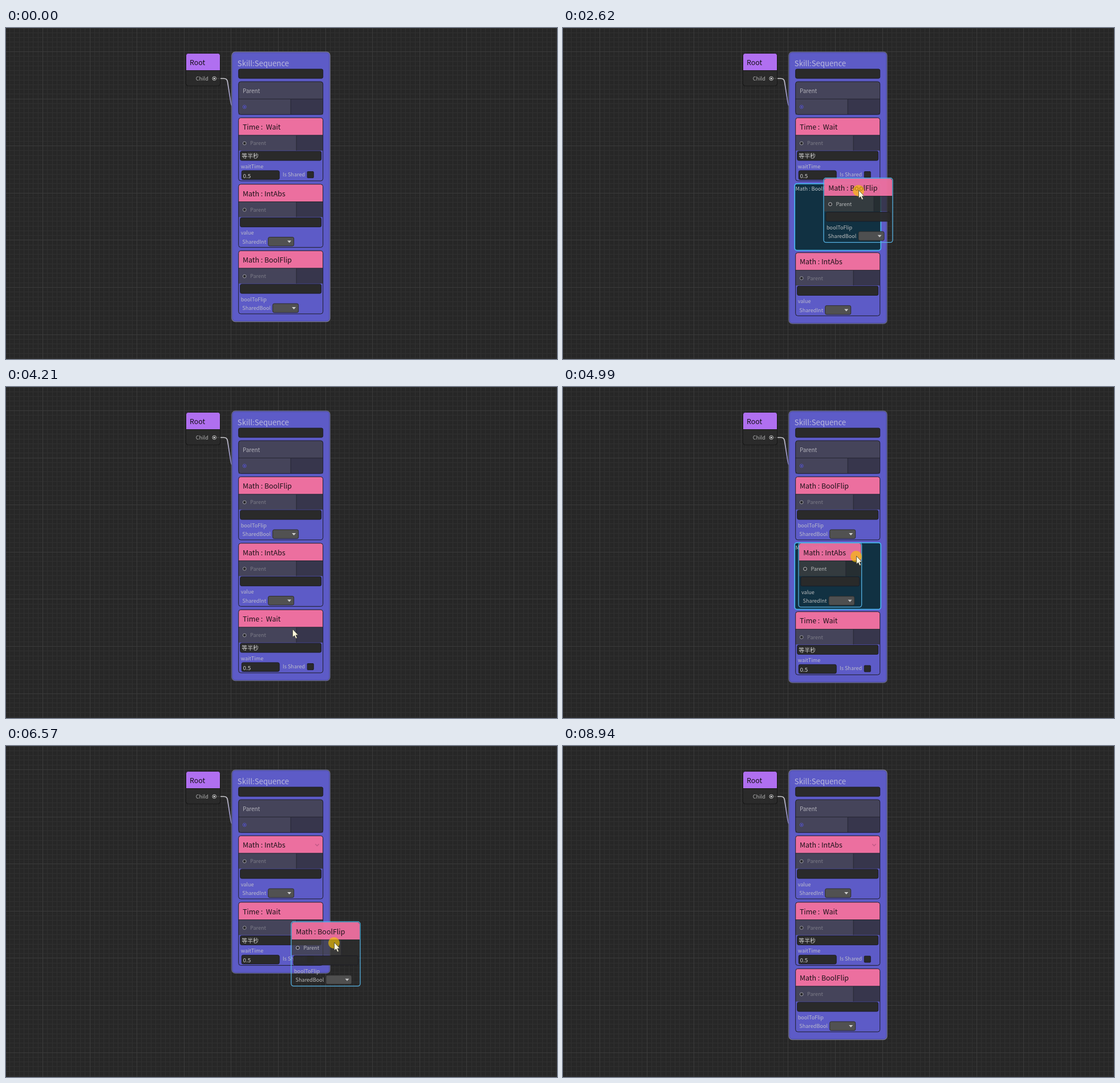
An HTML page that plays this animation: 966x580 px, repeating every 10 s.

```html
<!DOCTYPE html>
<html lang="en">
<head>
<meta charset="utf-8">
<title>Behaviour tree: reordering a sequence</title>
<style>
html, body { margin: 0; width: 100%; height: 100%; overflow: hidden; background: #272727; }
svg { display: block; width: 966px; height: 580px; font-family: "Noto Sans CJK SC", "Noto Sans CJK JP", "Noto Sans", sans-serif; }
</style>
</head>
<body>
<svg viewBox="0 0 966 580">
  <defs>
    <linearGradient id="wire" gradientUnits="userSpaceOnUse" x1="376" y1="88" x2="396" y2="138">
      <stop offset="0" stop-color="#d0d0d0"/><stop offset="1" stop-color="#7f78c4"/>
    </linearGradient>
  </defs>
  <g id="back"></g>
  <g id="scene"></g>
</svg>
<script>
const LOOP = 10000, PITCH = 116.5, TOP = 157.3, LEFT = 407.7, NODE_H = 110.6;
const ROW = 'rgba(63,63,63,.8)', ROW_DARK = 'rgba(46,46,46,.8)', EDGE = '#1d1d28';

const NODES = {
  wait: { title: 'Time :\u00a0 Wait', w: 148, label: 'waitTime', note: '等半秒' },
  abs: { title: 'Math : IntAbs', w: 108.6, label: 'value', type: 'SharedInt', menu: 52 },
  flip: { title: 'Math : BoolFlip', w: 119, label: 'boolToFlip', type: 'SharedBool', menu: 60 }
};

// runs of picture changes: first, last, count
const STEPS = [
  [130, 910, 7], [1320, 2230, 8], [2360, 2620, 3], [2770, 2890, 2], [3040, 3950, 8], [4080, 4990, 8],
  [5120, 5380, 3], [5530, 6440, 8], [6570, 7480, 8], [7610, 7870, 3], [8020, 8020, 1], [8420, 8940, 5]
];

// pointer path: time, x, y
const PATH = [
  [130, 899, 570], [390, 720, 512], [650, 520, 430], [780, 468, 411], [1320, 476, 410],
  [1450, 575, 398], [1710, 622, 365], [1970, 652, 330], [2230, 657, 308], [2360, 622, 296],
  [2490, 560, 288], [2620, 518, 285], [2770, 516, 280], [2890, 508, 255], [3040, 492, 215],
  [3170, 479, 183], [3300, 505, 195], [3430, 560, 228], [3560, 590, 254], [3690, 575, 330],
  [3820, 535, 400], [3950, 509, 425], [4210, 502, 425], [4730, 508, 297], [4860, 508, 297],
  [4990, 514, 297], [5120, 590, 265], [5250, 634, 215], [5380, 566, 164], [5660, 528, 159],
  [5790, 526, 162], [6180, 482, 309], [6440, 515, 325], [6570, 575, 345], [6700, 635, 370],
  [6960, 550, 388], [7090, 518, 390], [7350, 506, 410], [7610, 520, 416], [7870, 739.5, 437.5],
  [8020, 739.5, 437.5], [8420, 752, 446], [8810, 926, 566]
];

const PRESSES = [[910, 2770], [3170, 4210], [4860, 5790], [6180, 7610], [7870, 8020]];

// from, to, node, pointer offset inside the node
const DRAGS = [
  [1450, 2770, 'flip', 60, 21], [3300, 4210, 'wait', 71, 26], [4990, 5530, 'abs', 100, 23],
  [5530, 5790, 'abs', 93.5, 21], [6310, 7610, 'flip', 74, 36]
];

// child order after each drop
const ORDERS = [
  [0, 'wait abs flip'], [2770, 'wait flip abs'], [4210, 'flip abs wait'],
  [5790, 'abs flip wait'], [7610, 'abs wait flip']
];

const within = (t, [a, b]) => t >= a && t < b;

function rect(x, y, w, h, fill, stroke = 'none', r = 0, sw = 1) {
  return `<rect x="${x}" y="${y}" width="${w}" height="${h}" rx="${r}" fill="${fill}" stroke="${stroke}" stroke-width="${sw}"/>`;
}
function text(x, y, s, size, fill) {
  return `<text x="${x}" y="${y}" font-size="${size}" fill="${fill}">${s}</text>`;
}
function path(d, fill, stroke = 'none', sw = 1) {
  return `<path d="${d}" fill="${fill}" stroke="${stroke}" stroke-width="${sw}"/>`;
}
function circle(x, y, r, fill, stroke = 'none') {
  return `<circle cx="${x}" cy="${y}" r="${r}" fill="${fill}" stroke="${stroke}"/>`;
}
const at = (x, y, body, extra = '') => `<g transform="translate(${x} ${y})" ${extra}>${body}</g>`;
const header = (w, h, fill) => path(`M0 ${h}V4Q0 0 4 0H${w - 4}Q${w} 0 ${w} 4V${h}Z`, fill);
const field = (x, y, w, h) => rect(x, y, w, h, '#2a2a2a', '#1c1c24', 2.5);

function grid() {
  const step = 8.26;
  let minor = '', major = '';
  for (let i = -8; i < 112; i++) {
    const x = Math.floor(64.5 + i * step) + .5, y = Math.floor(41.5 + i * step) + .5;
    const d = `M${x} 0V580M0 ${y}H966`;
    if (i % 10) minor += d; else major += d;
  }
  return path(minor, 'none', '#303030') + path(major, 'none', '#3b3b3b');
}

function root() {
  return path('M368 88.5H382Q387.5 88.5 388.4 94L394 130Q395 138 400 138', 'none', 'url(#wire)', 1.7) +
    at(315.5, 44.3,
      rect(0, 0, 60, 57.2, 'rgba(43,43,43,.85)', '#191919', 4) +
      header(60, 30, '#b06ff0') + path('M0 30.2H60', 'none', '#1d1d1d') +
      rect(0, 0, 60, 57.2, 'none', '#191919', 4) +
      text(6.5, 20.8, 'Root', 12.4, '#141018') +
      text(17.3, 48, 'Child', 9.1, '#b4b4b4') +
      circle(49.7, 44.2, 3.3, '#222', '#c8c8c8') + circle(49.7, 44.2, 1.6, '#d8d8d8'));
}

function node(n, w, held, chevron) {
  const split = w / 2 + 27.5, ink = held ? '#c4c4c4' : '#bcbccb';
  let s = header(w, 30.5, '#ec6f9f') +
    rect(0, 30.5, split, 27, ROW) + rect(split, 30.5, w - split, 27, ROW_DARK) +
    path(`M0 30.7H${w}M${split} 31V57.5`, 'none', '#25252f') +
    text(7.2, 20.8, n.title, 12.4, '#1c1218') +
    circle(10.5, 44.7, 2.9, '#2a2a2e', held ? '#d0d0d0' : '#9c9ca4') +
    text(20.4, 48.2, 'Parent', 9.1, held ? '#c0c0c0' : '#7d7c88') +
    field(3, 58.6, w - 6, 16.2) +
    text(4, 88.7, n.label, 9.1, ink);
  if (n.type) {
    const m = n.menu;
    s += text(6.6, 104.2, n.type, 9.1, ink) +
      rect(m, 92.7, 45, 15.6, '#515151', '#2c2c2c', 2.5) +
      path(`M${m + 33.5} 98.7h7l-3.5 4z`, '#cfcfcf');
  } else {
    s += text(5.6, 71.2, n.note, 9.9, '#d2d2d2') +
      field(5.5, 92.6, 66, 15.6) + text(7.8, 105.4, '0.5', 9.9, '#d2d2d2') +
      text(77.3, 102.7, 'Is Shared', 9.1, ink) + rect(120.5, 94.3, 11, 11, '#2a2a2a', '#1c1c24', 1);
  }
  if (chevron) s += path(`M${w - 13.5} 14.5l3.2 3.2l3.2 -3.2`, 'none', '#c05a86', 1.4);
  return s + (held
    ? rect(-1, -1, w + 2, NODE_H + 2, 'none', '#58b8ea', 4, 1.3)
    : rect(0, 0, w, NODE_H, 'none', EDGE, 4));
}

function panel(w, bottom, idle) {
  const split = w / 2 + 17.5;
  return rect(396, 42, w + 24, bottom - 42, '#5d5bc7', idle ? '#74748f' : '#62647f', 6, 1.4) +
    rect(397.2, 43.2, w + 21.6, bottom - 44.4, 'none', '#4f4eae', 5) +
    text(405.8, 66.6, 'Skill:Sequence', 13.2, '#bab9dd') +
    field(LEFT, 72, w, 16.2) +
    at(LEFT, 94,
      header(w, 30.2, ROW) +
      rect(0, 30.2, split, 27.4, ROW) + rect(split, 30.2, w - split, 27.4, ROW_DARK) +
      path(`M0 30.4H${w}M${split} 31V57`, 'none', '#25252f') +
      rect(0, 0, w, 57.6, 'none', EDGE, 4) +
      text(7.2, 19.6, 'Parent', 9.9, '#b4b3bc') +
      circle(10.5, 44.2, 2.9, '#34344a', '#5c5ad2') + circle(10.5, 44.2, 1.2, '#6a68e0'));
}

function slot(y, w, title) {
  return rect(406.2, y - 1, w + 3.6 - .6, 116.8, '#113142', '#48b4ee', 4, 1.8) +
    text(407.6, y + 10.8, title, 9.1, '#c2cacf');
}

function pointer(t) {
  const i = PATH.findIndex(k => k[0] > t);
  if (i < 1) return PATH[PATH.length - 1].slice(1);
  const [t0, x0, y0] = PATH[i - 1], [t1, x1, y1] = PATH[i], p = (t - t0) / (t1 - t0);
  return [x0 + (x1 - x0) * p, y0 + (y1 - y0) * p];
}

function cursor(t, x, y) {
  const spot = PRESSES.some(p => within(t, p)) ? circle(0, 0, 10, 'rgba(248,198,0,.63)') : '';
  return at(x, y, spot +
    path('M.5 -.8V13.4L3.7 10.6L6 15.8L8.4 14.8L6.2 9.8H10.3Z', '#fdf8dc', '#3a3a34', .8));
}

function scene(t) {
  const [x, y] = pointer(t);
  const drag = DRAGS.find(d => within(t, d));
  let kids = ORDERS.filter(o => o[0] <= t).pop()[1].split(' ');
  if (drag) kids = kids.filter(k => k !== drag[2]);
  let w = Math.max(...kids.map(k => NODES[k].w));
  const over = drag && x < LEFT + w + 12;
  if (over) {
    w = 148;
    kids.splice(Math.max(0, Math.min(2, Math.floor((y - 150) / 118))), 0, null);
  }

  let top = TOP, inner = '';
  for (const k of kids) {
    if (k) inner += at(LEFT, top, node(NODES[k], w, false, k === 'abs' && t >= 5790));
    else inner += slot(top, w, NODES[drag[2]].title);
    top += k ? PITCH : PITCH + 3.4;
  }
  let s = panel(w, top + 7.8, t < 650 || t >= 7870) + inner;
  if (drag) {
    const n = NODES[drag[2]];
    s += at(x - drag[3], y - drag[4], node(n, n.w, true), 'opacity=".96"');
  }
  return t >= 130 && t < 8940 ? s + cursor(t, x, y) : s;
}

// hold each picture until the next change
function snap(t) {
  let last = 0;
  for (const [a, b, n] of STEPS) {
    if (t < a) break;
    const gap = n > 1 ? (b - a) / (n - 1) : 1;
    last = a + Math.min(n - 1, Math.floor((t - a) / gap + 1e-6)) * gap;
  }
  return Math.round(last / 10) * 10;
}

document.getElementById('back').innerHTML = grid() + root();
const stage = document.getElementById('scene');
const start = performance.now();
let shown = -1;

function draw() {
  const t = snap((performance.now() - start) % LOOP);
  if (t !== shown) stage.innerHTML = scene(shown = t);
  requestAnimationFrame(draw);
}
draw();
</script>
</body>
</html>
```
